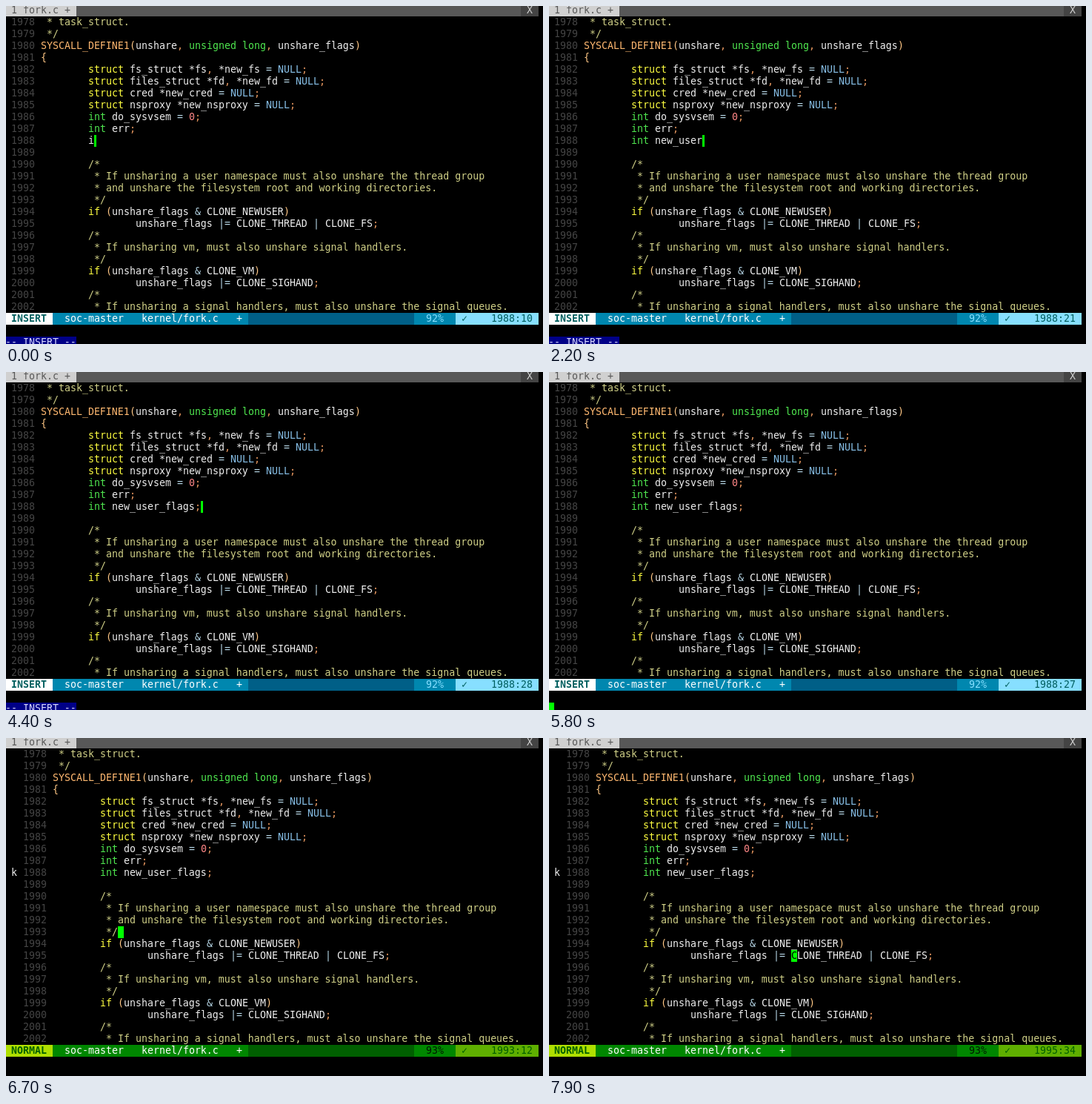
These frames come from a looping animation (725x456 px, 8 s). An HTML page:

```html
<!DOCTYPE html>
<html lang="en">
<head>
<meta charset="utf-8">
<title>Editing fork.c</title>
<style>
html, body { margin: 0; width: 100%; height: 100%; overflow: hidden; background: #000; }
svg { display: block; }
text { font: 13.288px "DejaVu Sans Mono", "Liberation Mono", monospace; white-space: pre; }
</style>
</head>
<body>
<svg id="stage" width="725" height="456" viewBox="0 0 725 456"></svg>
<script>
const LOOP = 8000, FIRST = 1978, EDITED = 1988;
const TYPED = "        int new_user_flags;";
const source = ` * task_struct.
 */
SYSCALL_DEFINE1(unshare, unsigned long, unshare_flags)
{
        struct fs_struct *fs, *new_fs = NULL;
        struct files_struct *fd, *new_fd = NULL;
        struct cred *new_cred = NULL;
        struct nsproxy *new_nsproxy = NULL;
        int do_sysvsem = 0;
        int err;
${TYPED}

        /*
         * If unsharing a user namespace must also unshare the thread group
         * and unshare the filesystem root and working directories.
         */
        if (unshare_flags & CLONE_NEWUSER)
                unshare_flags |= CLONE_THREAD | CLONE_FS;
        /*
         * If unsharing vm, must also unshare signal handlers.
         */
        if (unshare_flags & CLONE_VM)
                unshare_flags |= CLONE_SIGHAND;
        /*
         * If unsharing a signal handlers, must also unshare the signal queues.`.split("\n");

const PLAIN = "#eeeeee", COMMENT = "#d0d087", GREEN = "#00ff00";
const RULES = [
  [/^(struct|if)$/, "#ffff40"],
  [/^(int|unsigned|long)$/, "#4fe74f"],
  [/^SYSCALL_DEFINE1$/, "#ffb870"],
  [/^NULL$/, "#87bfe7"],
  [/^\d+$/, "#ff8787"],
  [/^[;,]$/, "#e7975f"],
  [/^[(){}]$/, "#ffc785"],
  [/^[=&|]+$/, "#b7d7e7"]
];

// Milliseconds and number of characters typed after the indent.
const typing = [[0, 1], [500, 2], [1200, 3], [1500, 4], [1600, 5], [1700, 7], [1800, 8],
  [2000, 10], [2200, 12], [2500, 13], [2600, 14], [2700, 15], [2800, 16], [2900, 17],
  [3000, 18], [4400, 19]];
// Milliseconds, cursor line and column, line shown in the status bar if it lags.
const moves = [[5900, 1988, 27], [6200, 1989, 1], [6300, 1990, 11], [6400, 1991, 27],
  [6500, 1992, 27, 1991], [6600, 1992, 27], [6700, 1993, 12], [6800, 1994, 27],
  [6900, 1995, 27], [7000, 1995, 30], [7100, 1995, 31], [7200, 1995, 32],
  [7300, 1995, 31], [7500, 1995, 32], [7600, 1995, 33], [7900, 1995, 34]];

const themes = {
  insert: { mode: "INSERT", modeBg: "#ffffff", modeFg: "#005f5f", bg: "#0087af", mid: "#005f87",
    pct: "#87dfff", posBg: "#87dfff", posFg: "#005f5f" },
  normal: { mode: "NORMAL", modeBg: "#afdf00", modeFg: "#005f00", bg: "#008700", mid: "#005f00",
    pct: "#001800", posBg: "#5faf00", posFg: "#005f00" }
};

const stage = document.getElementById("stage");
const cellX = col => 8 * col - 1;
const rowY = row => 16 * row - 2;
const lineRow = line => line - FIRST + 1;
const latest = (list, t) => list.filter(item => item[0] <= t).pop();

function add(parent, name, attrs) {
  const node = document.createElementNS("http://www.w3.org/2000/svg", name);
  for (const key in attrs) node.setAttribute(key, attrs[key]);
  return parent.appendChild(node);
}
const group = () => add(stage, "g", {});

function rect(parent, x, y, width, height, fill) {
  return add(parent, "rect", { x, y, width, height, fill });
}

function cells(parent, from, to, row, fill) {
  const x = Math.max(0, cellX(from));
  return rect(parent, x, rowY(row), cellX(to) - x, 16, fill);
}

function write(parent, col, row, str, fill, bold) {
  const node = add(parent, "text", { x: cellX(col), y: rowY(row) + 12, fill });
  if (bold) node.style.fontWeight = "bold";
  node.textContent = str;
  return node;
}

function writeCode(parent, row, str, plain) {
  if (/^\s*(\/\*|\*)/.test(str)) {
    const indent = str.search(/\S/);
    write(parent, 6 + indent, row, str.slice(indent), COMMENT);
    return;
  }
  for (const m of str.matchAll(/\w+|[=&|]+|[^\s\w]/g)) {
    const rule = !plain && RULES.find(r => r[0].test(m[0]));
    write(parent, 6 + m.index, row, m[0], rule ? rule[1] : PLAIN);
  }
}

// Tab line
const tabs = group();
cells(tabs, 0, 12, 0, "#d0d0d0");
cells(tabs, 12, 87, 0, "#585858");
cells(tabs, 87, 90, 0, "#444444");
write(tabs, 1, 0, "1 fork.c +", "#585858");
write(tabs, 88, 0, "X", "#d0d0d0");

// Code
const code = group();
source.forEach((str, i) => {
  write(code, 1, i + 1, String(FIRST + i), "#444444");
  if (FIRST + i !== EDITED) writeCode(code, i + 1, str);
});
const edited = add(code, "g", {});
const sign = write(stage, 1, lineRow(EDITED), "k", PLAIN);
const cursor = group();

// Status line
const status = group();
const bars = {
  mode: cells(status, 0, 8, 26),
  left: cells(status, 8, 41, 26),
  mid: cells(status, 41, 69, 26),
  right: cells(status, 69, 76, 26),
  pos: cells(status, 76, 90, 26)
};
const mode = write(status, 1, 26, "", "", true);
write(status, 10, 26, "soc-master", "#ffffff");
write(status, 23, 26, "kernel/fork.c", "#ffffff");
write(status, 39, 26, "+", "#ffffff");
const percent = write(status, 71, 26, "", "");
const check = write(status, 77, 26, "✓", "", true);
const position = write(status, 82, 26, "", "");

// Message line
const message = group();
cells(message, 0, 12, 28, "#000087");
write(message, 0, 28, "-- INSERT --", "#d7d7ff");

function paintStatus(theme, line, col) {
  const fills = { mode: theme.modeBg, left: theme.bg, mid: theme.mid, right: theme.bg, pos: theme.posBg };
  for (const key in fills) bars[key].setAttribute("fill", fills[key]);
  mode.textContent = theme.mode;
  mode.setAttribute("fill", theme.modeFg);
  percent.textContent = line < 1992 ? "92%" : "93%";
  percent.setAttribute("fill", theme.pct);
  check.setAttribute("fill", theme.posFg);
  position.textContent = line + ":" + col;
  position.setAttribute("fill", theme.posFg);
}

function paintInsert(t) {
  const length = latest(typing, t)[1];
  const col = t >= 4700 ? 27 : 9 + length;
  writeCode(edited, lineRow(EDITED), TYPED.slice(0, 8 + length), t < 1300);
  if (t < 5800) rect(cursor, cellX(5 + col), rowY(lineRow(EDITED)), 3, 16, GREEN);
  else cells(cursor, 0, 1, 28, GREEN);
  paintStatus(themes.insert, EDITED, col);
}

function paintNormal(t) {
  const [, line, col, shown = line] = latest(moves, t);
  const row = lineRow(line);
  writeCode(edited, lineRow(EDITED), TYPED);
  cells(cursor, 7 + col, 8 + col, row, GREEN);
  write(cursor, 7 + col, row, source[line - FIRST][col - 1] || "", "#000000");
  paintStatus(themes.normal, shown, col);
}

let painted = -1;
function render(t) {
  const step = Math.floor(t / 100);
  if (step === painted) return;
  painted = step;
  const normal = t >= 5900;
  edited.replaceChildren();
  cursor.replaceChildren();
  code.setAttribute("transform", `translate(${normal ? 16 : 0} 0)`);
  sign.setAttribute("visibility", normal ? "visible" : "hidden");
  message.setAttribute("visibility", t < 5800 ? "visible" : "hidden");
  (normal ? paintNormal : paintInsert)(t);
}

const start = performance.now();
function tick() {
  render((performance.now() - start) % LOOP);
  requestAnimationFrame(tick);
}
tick();
</script>
</body>
</html>
```
